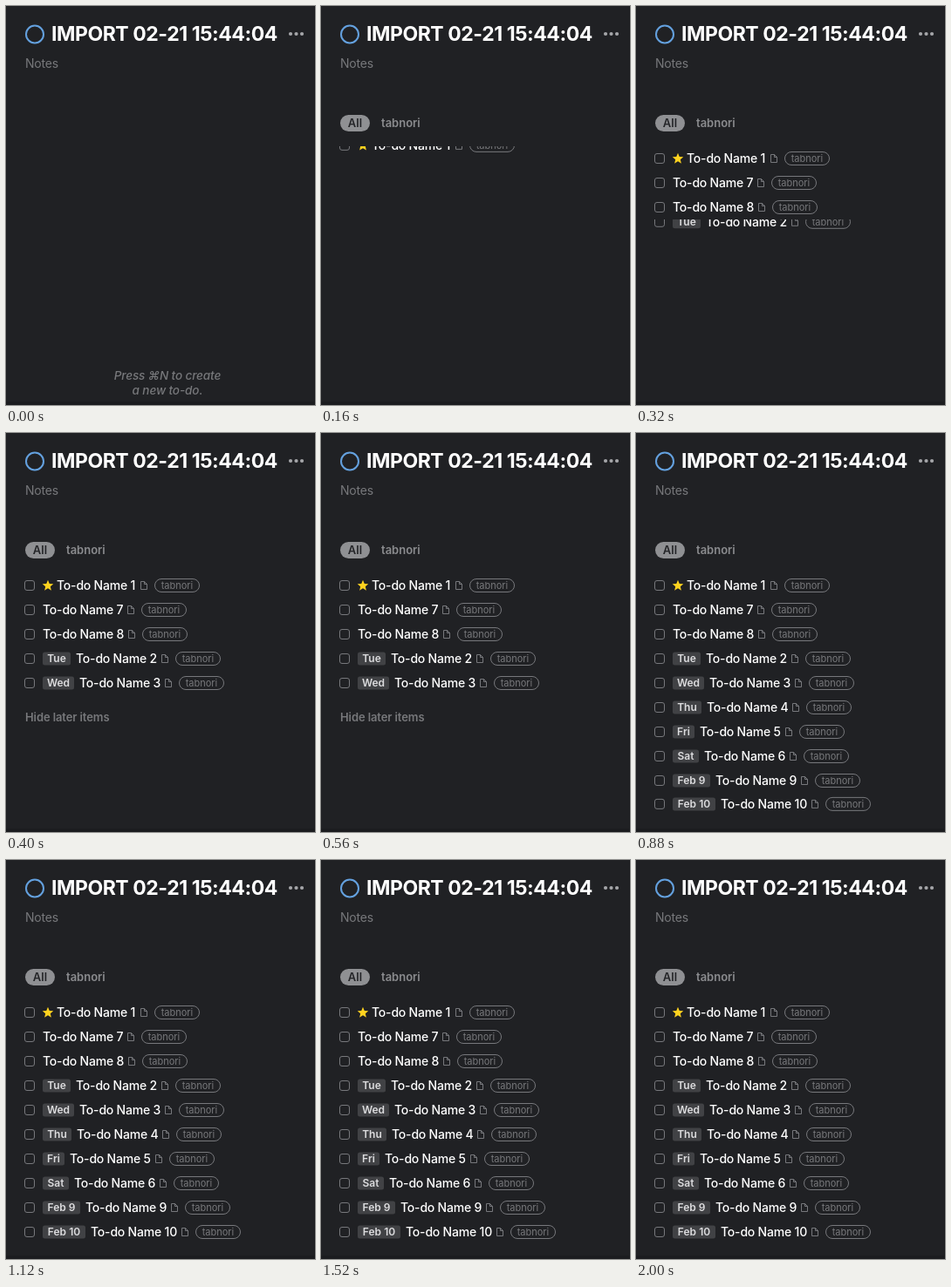
Recreate the animation shown at these times as an HTML page. Size 354 by 458 pixels, loop 2.32 s.

```html
<!DOCTYPE html>
<html lang="en">
<head>
<meta charset="utf-8">
<title>To-do import</title>
<style>
html, body { margin: 0; width: 354px; height: 458px; overflow: hidden; background: #202124; }
svg { display: block; }
text { font-family: Inter, "Noto Sans", sans-serif; fill: #77787b; }
.title { font-size: 23px; font-weight: 700; letter-spacing: -.45px; fill: #fff; }
.notes { font-size: 14px; letter-spacing: -.2px; }
.hint { font-size: 13.5px; font-weight: 500; font-style: italic; letter-spacing: -.1px; text-anchor: middle; }
.tag { font-size: 13px; font-weight: 600; fill: #8b8c8f; }
.later { font-size: 13px; font-weight: 600; letter-spacing: -.1px; }
.name { font-size: 14px; font-weight: 500; letter-spacing: -.2px; fill: #fff; }
.day { font-size: 12px; font-weight: 600; fill: #dcdcde; text-anchor: middle; }
.pill { font-size: 11px; text-anchor: middle; }
.line { fill: none; stroke: #77787c; }
</style>
</head>
<body>
<svg width="354" height="458">
  <path d="M0 456H354M353.5 0V458" stroke="#1b1c1f" id="edge"/>
  <rect y="454" width="354" height="4" fill="#1b1c1f"/>
  <circle cx="33" cy="32.5" r="10" fill="none" stroke="#64a1df" stroke-width="2"/>
  <text class="title" x="52" y="40">IMPORT 02-21 15:44:04</text>
  <g fill="#a5a6a9">
    <circle cx="326" cy="32" r="2.1"/><circle cx="332.5" cy="32" r="2.1"/><circle cx="339" cy="32" r="2.1"/>
  </g>
  <text class="notes" x="22" y="71">Notes</text>
  <g id="hint">
    <text class="hint" x="185" y="429">Press ⌘N to create</text>
    <text class="hint" x="185" y="446">a new to-do.</text>
  </g>
  <g id="tags">
    <rect x="22" y="125" width="34" height="19" rx="9.5" fill="#8f9093"/>
    <text class="tag" x="39" y="139" text-anchor="middle" style="fill:#242528">All</text>
    <text class="tag" x="69" y="139">tabnori</text>
  </g>
  <g id="list"></g>
  <text class="later" id="later" x="22">Hide later items</text>
</svg>
<script>
const LOOP = 2320, STEP = 80, ROW = 28, TOP = 161;
const $ = id => document.getElementById(id);

// [number, day badge, badge width, distance from name to file icon]
const items = [
  [1, '', 0, 100], [7, '', 0, 101], [8, '', 0, 102],
  [2, 'Tue', 32, 102], [3, 'Wed', 36, 102], [4, 'Thu', 33, 102],
  [5, 'Fri', 25, 102], [6, 'Sat', 30, 102],
  [9, 'Feb 9', 43, 102], [10, 'Feb 10', 49, 108]
];

// Rows revealed and position of the footer link, one entry per step
const shown = [0, 0, .46, 2, 3.6, 5, 5, 5, 6.4, 8, 9, 9.96, 10];
const laterY = { 5: 326, 6: 326, 7: 326, 8: 375, 9: 425, 10: 453 };

function starPoints(cx, cy, r) {
  return Array.from({ length: 10 }, (_, i) => {
    const a = i * Math.PI / 5, k = i % 2 ? r * .45 : r;
    return (cx + k * Math.sin(a)).toFixed(2) + ',' + (cy - k * Math.cos(a)).toFixed(2);
  }).join(' ');
}

function rowMarkup([num, day, width, gap], i) {
  const x = day ? 48 + width : i ? 42 : 58, icon = x + gap;
  const lead = day
    ? `<rect x="42" y="6.5" width="${width}" height="15" rx="2.5" fill="#414245"/>
       <text class="day" x="${42 + width / 2}" y="18.3">${day}</text>`
    : i ? '' : `<polygon points="${starPoints(48, 14.3, 6.6)}" fill="#ffd21f"/>`;
  return `<svg y="${TOP + ROW * i}" width="354" height="${ROW}"><g>
    <rect class="line" x="21.5" y="8.5" width="11" height="11" rx="2.5"/>
    ${lead}
    <text class="name" x="${x}" y="19">To-do Name ${num}</text>
    <path class="line" transform="translate(${icon - 4} 9)" d="M.5 .5H4.5L7.5 3.5V9.5H.5ZM4.5 .5V3.5H7.5"/>
    <rect class="line" x="${icon + 12.5}" y="6.5" width="51" height="15" rx="7.5"/>
    <text class="pill" x="${icon + 38}" y="18">tabnori</text>
  </g></svg>`;
}

$('list').innerHTML = items.map(rowMarkup).join('');
const rows = [...$('list').children];

function draw(time) {
  const step = Math.floor(time % LOOP / STEP);
  const count = shown[Math.min(step, shown.length - 1)];
  rows.forEach((row, i) => {
    const open = Math.max(0, Math.min(1, count - i));
    row.style.display = open ? '' : 'none';
    row.firstElementChild.setAttribute('transform', `translate(0 ${(open - 1) * ROW})`);
  });
  $('hint').style.display = step ? 'none' : '';
  $('tags').style.opacity = Math.min(1, step / 2);
  $('later').style.display = laterY[step] ? '' : 'none';
  $('later').setAttribute('y', (laterY[step] || 0) + 5);
}

const start = performance.now();
function tick() {
  draw(performance.now() - start);
  requestAnimationFrame(tick);
}
tick();
</script>
</body>
</html>
```
